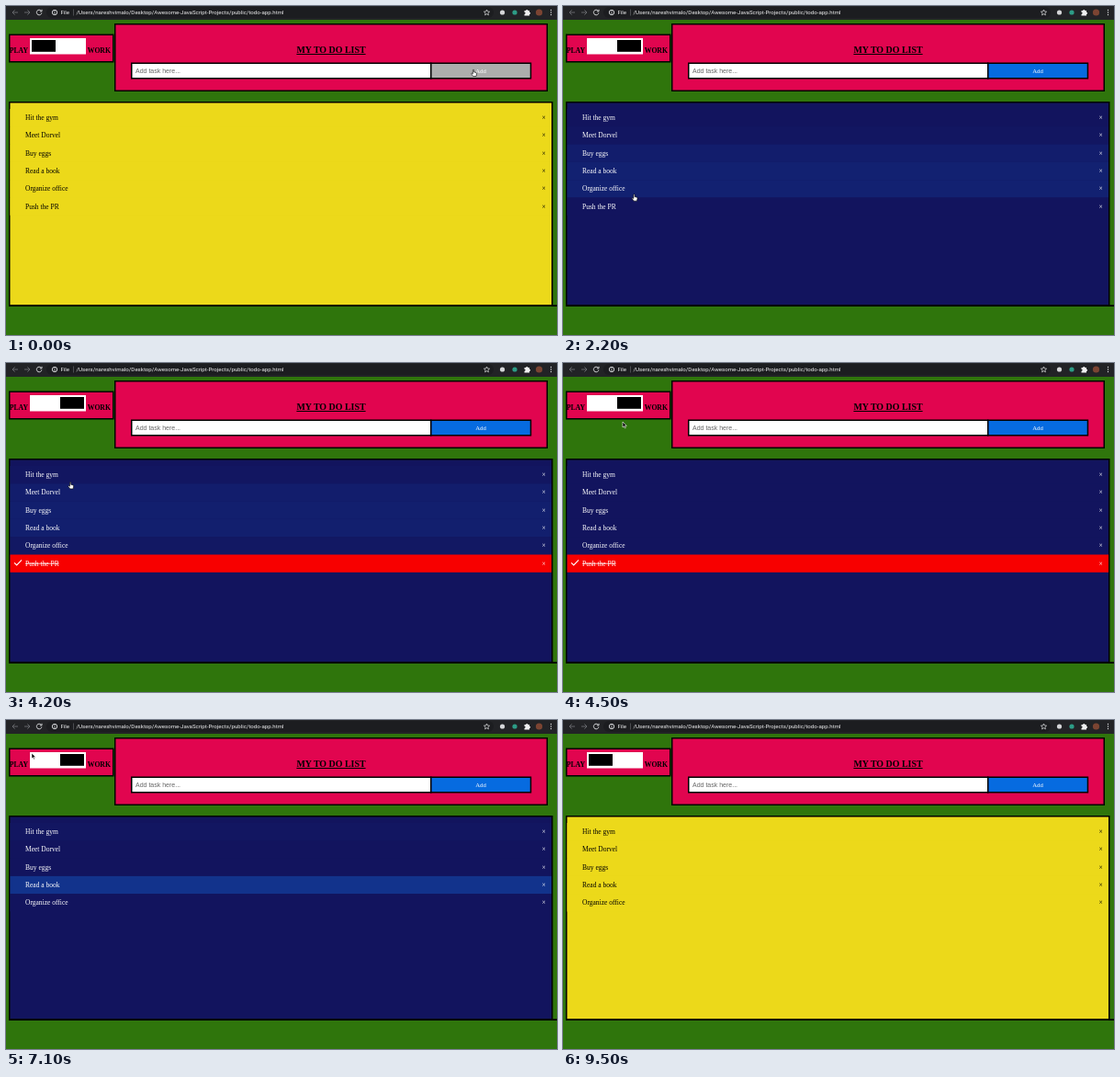
Write an HTML page that moves like this. It is 600 px wide and 358 px high and loops after 9600 ms.

```html
<!DOCTYPE html>
<html lang="en">
<head>
<meta charset="utf-8">
<title>To do list</title>
<style>
  html, body { margin: 0; width: 100%; height: 100%; overflow: hidden; background: #2f750c; }
  svg { display: block; width: 600px; height: 358px; }
  text { font-family: "Liberation Serif", Times, serif; font-size: 7.5px; white-space: pre; }
  .chrome text { font-family: Roboto, sans-serif; font-size: 6.13px; fill: #f1f1f2; }
  .line { fill: none; stroke: #e4e5e7; stroke-width: .9; }
  .box { stroke: #000; stroke-width: 1.5; }
  .pink { fill: #e1054f; }
  .bold { font-weight: bold; font-size: 7.7px; }
</style>
</head>
<body>
<svg viewBox="0 0 600 358">
  <rect width="600" height="358" fill="#2f750c"/>

  <g class="chrome">
    <rect width="600" height="15" fill="#222326"/>
    <rect x="44" y="1" width="487" height="12" rx="6" fill="#1c1d20"/>
    <path class="line" style="stroke:#6d6f73" d="M13 7H7m2.6-2.6L7 7l2.6 2.6M20 7h6m-2.6-2.6L26 7l-2.6 2.6"/>
    <path class="line" d="M38.3 5.2a2.8 2.8 0 1 0 .6 2.3M39 3.8v2.1h-2.1"/>
    <circle class="line" cx="53" cy="7" r="2.7"/>
    <path class="line" d="M53 6.6v2M53 5v.8"/>
    <text x="59.5" y="9.2">File</text>
    <path class="line" style="stroke:#6d6f73;stroke-width:.6" d="M73.5 3.5v7"/>
    <text x="76.5" y="9.2">/Users/nareshvimalo/Desktop/Awesome-JavaScript-Projects/public/todo-app.html</text>
    <path class="line" style="stroke-width:.7" d="M523.5 4l.9 2 2.2.2-1.7 1.5.5 2.2-1.9-1.2-1.9 1.2.5-2.2-1.7-1.5 2.2-.2z"/>
    <circle cx="540.5" cy="7" r="2.6" fill="#d5d6d8"/>
    <circle cx="554" cy="7" r="2.6" fill="#2d9c86"/>
    <path fill="#f1f1f2" d="M564.5 5h1.7a1.1 1.1 0 0 1 2.2 0h1.6v1.7a1.1 1.1 0 0 1 0 2.2v1.6h-5.5V8.9a1.1 1.1 0 0 0 0-2.2z"/>
    <circle cx="580.5" cy="7" r="3.6" fill="#7b4432"/>
    <path stroke="#e4e5e7" stroke-width="1.3" stroke-linecap="round" stroke-dasharray="0 2.5" d="M593.5 4.5v5.1"/>
  </g>

  <rect class="box pink" x="3.75" y="31.25" width="113" height="29.5"/>
  <text class="bold" x="3.8" y="51">PLAY</text>
  <text class="bold" x="88.7" y="51">WORK</text>
  <rect x="26" y="35" width="61" height="17.5" fill="#fff"/>
  <rect id="knob" y="37" width="26" height="12.8"/>

  <rect class="box pink" x="118.75" y="19.75" width="470.5" height="72.5"/>
  <text x="354" y="51" text-anchor="middle" style="font-size:9.95px;font-weight:bold;text-decoration:underline">MY TO DO LIST</text>
  <rect class="box" x="136.75" y="62.25" width="326" height="16.5" fill="#fff"/>
  <text x="141" y="73" fill="#666" style="font-family:'Liberation Sans',Arial,sans-serif;font-size:7px">Add task here...</text>
  <rect class="box" id="button" x="462.75" y="62.25" width="108.7" height="16.5"/>
  <text x="517" y="73" text-anchor="middle" fill="#fff" style="font-size:6.7px">Add</text>

  <rect class="box" id="list" x="3.75" y="104.75" width="591" height="221"/>
  <g id="rows"></g>
  <path stroke="#000" stroke-width="1.7" d="M3 326.2h597"/>

  <g id="cursor" stroke-linejoin="round">
    <path id="arrow" fill="#000" stroke="#fff" stroke-width=".6" d="M0 0v6l1.4-1.2.9 2.1 1-.4-.9-2.1h1.9z"/>
    <path id="hand" fill="#fff" stroke="#000" stroke-width=".6" d="M-.6.5q.6-1 1.2 0v2.4l2.4.6q.7.3.6 1.1l-.6 2.9H-.3L-2.3 4.9q0-1 .9-.7l.8.7z"/>
  </g>
</svg>
<script>
const LOOP = 9600, FADE = 200;
const WORK_ON = 1180, CHECK = 2950, REMOVE = 5900, WORK_OFF = 7400, CURSOR_OUT = 9000;
const TOP = 112, PITCH = 19.3;
const YELLOW = [236, 217, 26], NAVY = [18, 20, 94], HOVER = [18, 56, 148], RED = [247, 0, 0];
const BLUE = [6, 107, 224], GREY = [173, 173, 173], BLACK = [0, 0, 0], WHITE = [255, 255, 255];
const tasks = ["Hit the gym", "Meet Dorvel", "Buy eggs", "Read a book", "Organize office", "Push the PR"];

// Pointer stops: time, x, y
const stops = [
  [0, 509, 69], [150, 509, 69], [900, 36, 44], [1200, 33.5, 42], [1600, 33.5, 42],
  [2300, 80, 214], [2800, 77, 220], [3400, 77, 220], [3800, 78, 231], [4500, 65, 64],
  [5000, 300, 238], [5350, 480, 236], [5700, 592, 217], [5850, 585, 217], [6100, 583.5, 218],
  [6600, 583.5, 218], [6900, 300, 181], [7070, 120, 180], [7095, 28, 36], [7550, 28, 37],
  [8150, 440, 203], [8500, 400, 120], [9000, 362, 47], [LOOP, 362, 47]
];

const $ = id => document.getElementById(id);
const rgb = c => `rgb(${c.map(Math.round)})`;
const isWork = t => t >= WORK_ON && t < WORK_OFF;

function pointer(t) {
  const i = stops.findIndex(s => s[0] > t);
  const [t0, x0, y0] = stops[i - 1], [t1, x1, y1] = stops[i];
  const p = (t - t0) / (t1 - t0), e = p * p * (3 - 2 * p);
  return [x0 + (x1 - x0) * e, y0 + (y1 - y0) * e];
}

function hoveredRow(t) {
  const [x, y] = pointer(t), row = Math.floor((y - TOP) / PITCH);
  return x > 4 && x < 595 && row >= 0 && row < (t < REMOVE ? 6 : 5) ? row : -1;
}

function overButton(t) {
  const [x, y] = pointer(t);
  return x > 463 && x < 572 && y > 62 && y < 79;
}

// A linear colour transition is the mean of the wanted colour over its duration.
function fade(colorAt, t) {
  const steps = 20, sum = [0, 0, 0];
  for (let k = 0; k < steps; k++)
    colorAt(Math.max(0, t - k * FADE / steps)).forEach((v, i) => sum[i] += v / steps);
  return rgb(sum);
}

function rowColor(i, t) {
  if (i === 5 && t >= CHECK) return RED;
  return hoveredRow(t) === i ? HOVER : NAVY;
}

$("rows").innerHTML = tasks.map((task, i) => {
  const y = TOP + i * PITCH;
  return `<g><rect x="4.5" y="${y}" width="589.5" height="${PITCH}"/>
    <text x="21" y="${y + 12}">${task}</text>
    <text x="585.7" y="${y + 12}" text-anchor="middle">×</text></g>`;
}).join("");
const rows = [...$("rows").children];
rows[5].insertAdjacentHTML("beforeend",
  `<path id="check" fill="none" stroke="#fff" stroke-width="1.1" d="M9 217.3l2.7 2.7 5.3-5.6"/>`);

function draw(t) {
  const work = isWork(t), text = fade(s => isWork(s) ? WHITE : BLACK, t);
  $("knob").setAttribute("x", work ? 59 : 28);
  $("list").setAttribute("fill", rgb(work ? NAVY : YELLOW));
  $("button").setAttribute("fill", fade(s => overButton(s) ? GREY : BLUE, t));

  // The theme switches at once; only hover, check and text fade.
  rows.forEach((row, i) => {
    const [band, label, close] = row.children;
    band.setAttribute("fill", work ? fade(s => rowColor(i, s), t) : rgb(YELLOW));
    label.setAttribute("fill", text);
    close.setAttribute("fill", text);
  });
  const checked = t >= CHECK;
  rows[5].style.display = t < REMOVE ? "" : "none";
  rows[5].children[1].style.textDecoration = checked ? "line-through" : "none";
  $("check").style.display = checked ? "" : "none";

  const hand = hoveredRow(t) >= 0 || overButton(t);
  $("hand").style.display = hand ? "" : "none";
  $("arrow").style.display = hand ? "none" : "";
  $("cursor").style.display = t < CURSOR_OUT ? "" : "none";
  $("cursor").setAttribute("transform", `translate(${pointer(t)})`);
}

function tick() {
  draw(performance.now() % LOOP);
  requestAnimationFrame(tick);
}
tick();
</script>
</body>
</html>
```
